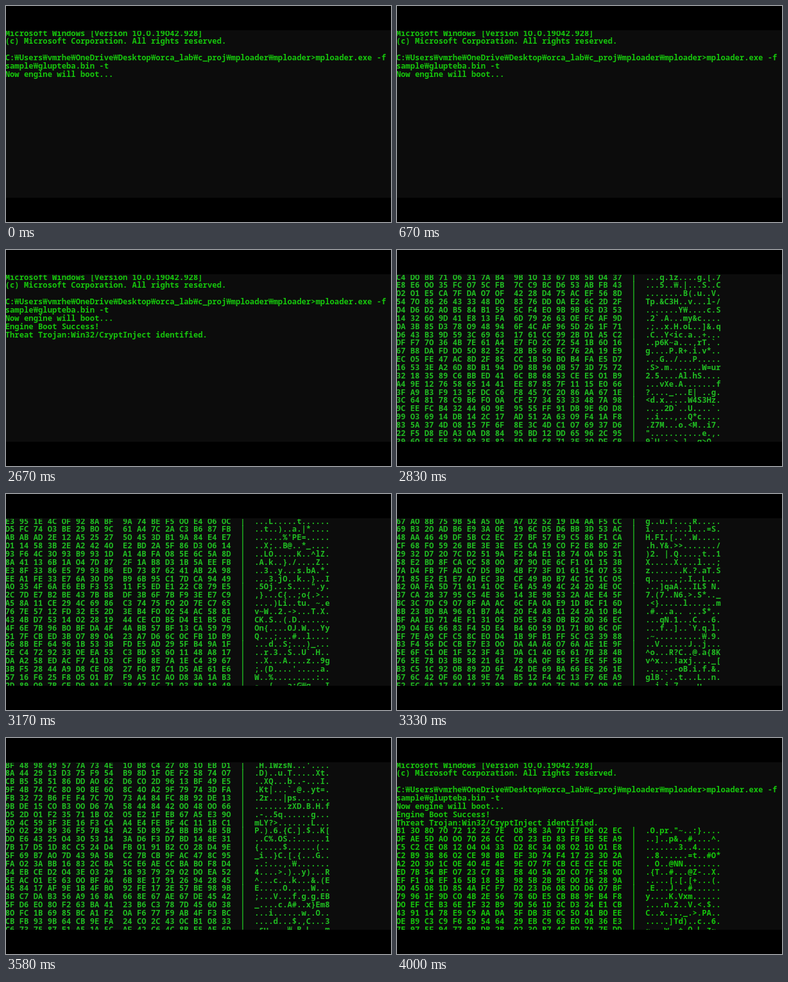
Write an HTML page with a canvas that moves like this. It is 600 by 338 pixels and loops after 4330 ms.

```html
<!DOCTYPE html>
<html lang="en">
<head>
<meta charset="utf-8">
<title>Console hex dump</title>
<style>
html, body { margin: 0; width: 100%; height: 100%; overflow: hidden; background: #000; }
canvas { display: block; width: 100vw; height: 100vh; }
</style>
</head>
<body>
<canvas width="600" height="338"></canvas>
<script>
const LOOP = 4330;
const CELL = 7.33, LEFT = -1.3, LINE = 12.85, BASELINE = 46.6, ROWS = 21;
const TOP = 38, BOTTOM = 300;
const GREEN = '#16c60c', DUMP_GREEN = '#20bc22';

const boot = [
  'Microsoft Windows [Version 10.0.19042.928]',
  '(c) Microsoft Corporation. All rights reserved.',
  '',
  'C:₩Users₩vmrhe₩OneDrive₩Desktop₩orca_lab₩c_proj₩mploader₩mploader>mploader.exe -f',
  'sample₩glupteba.bin -t',
  'Now engine will boot...'
];
const verdict = [
  'Engine Boot Success!',
  'Threat Trojan:Win32/CryptInject identified.'
];
const dumpHead = [
  'B1 30 80 70 72 12 22 7E 08 98 3A 7D E7 D6 02 EC',
  '0F AE 5D A0 00 70 26 CC C0 23 ED 83 FB EE 5E A9',
  'C5 C2 CE 08 12 04 04 33 D2 8C 34 08 02 10 01 E8',
  'C2 B9 38 86 02 CE 98 BB EF 3D 74 F4 17 23 30 2A',
  'A2 20 30 1C 0E 40 4E 4E 9E 07 7F CB CE CE CE DE',
  'ED 7B 54 BF 07 23 C7 83 E8 40 5A 2D C0 7F 58 0D',
  'EF F1 16 EF 16 5B 18 5B 98 5B 2B 9E 00 16 28 9A',
  '00 45 08 1D 85 4A FC F7 D2 23 D6 08 D0 D6 07 BF'
];

const ctx = document.querySelector('canvas').getContext('2d');

function randomByte(seed) {
  let h = Math.imul(seed + 1, 0x9e3779b1);
  h = Math.imul(h ^ (h >>> 15), 0x85ebca6b);
  h = Math.imul(h ^ (h >>> 13), 0xc2b2ae35);
  return (h >>> 16) & 255;
}

function dumpRow(row) {
  const bytes = dumpHead[row]
    ? dumpHead[row].split(' ').map(b => parseInt(b, 16))
    : Array.from({ length: 16 }, (_, i) => randomByte(row * 16 + i));
  const hex = bytes.map(b => b.toString(16).toUpperCase().padStart(2, '0'));
  const ascii = bytes.map(b =>
    b === 0x5c ? '₩' : b >= 0x20 && b < 0x7f ? String.fromCharCode(b) : '.');
  return hex.slice(0, 8).join(' ') + '  ' + hex.slice(8).join(' ') + '  |  ' + ascii.join('');
}

const dumpRows = (first, count) => Array.from({ length: count }, (_, i) => dumpRow(first + i));

// The console font has a plain zero, so it is drawn with the round letter.
function drawLine(text, row) {
  [...text].forEach((char, col) => {
    if (char !== ' ') {
      ctx.fillText(char === '0' ? 'O' : char, LEFT + (col + 0.5) * CELL, BASELINE + row * LINE);
    }
  });
}

function drawScreen(lines, { color = GREEN, cursor = false } = {}) {
  ctx.fillStyle = '#000';
  ctx.fillRect(0, 0, 600, 338);
  ctx.fillStyle = '#0c0c0c';
  ctx.fillRect(0, TOP, 600, BOTTOM - TOP);
  ctx.save();
  ctx.beginPath();
  ctx.rect(0, TOP + 1, 600, BOTTOM - TOP - 1);
  ctx.clip();
  ctx.font = '600 12.2px "Noto Sans Mono", "DejaVu Sans Mono", monospace';
  ctx.textAlign = 'center';
  ctx.fillStyle = color;
  lines.forEach(drawLine);
  if (cursor) {
    ctx.fillStyle = '#d4d8d4';
    ctx.fillRect(0, 122, 5, 4);
  }
  ctx.restore();
}

const showBoot = cursor => drawScreen(boot, { cursor });
const showVerdict = () => drawScreen([...boot, ...verdict]);
const showDump = page => drawScreen(dumpRows(page * 300, ROWS), { color: DUMP_GREEN });
const showResult = () => drawScreen([...boot, ...verdict, ...dumpRows(0, 13)]);

const scenes = [
  [0, () => showBoot(false)],
  [170, () => showBoot(true)],
  [670, () => showBoot(false)],
  [1170, () => showBoot(true)],
  [1750, () => showBoot(false)],
  [2250, () => showBoot(true)],
  [2670, showVerdict],
  ...[2750, 2830, 2920, 3000, 3080, 3170, 3250, 3330, 3420, 3500, 3580]
    .map((time, i) => [time, () => showDump(i + 1)]),
  [3670, showResult]
];

const start = performance.now();
let current = null;

function tick() {
  const time = (performance.now() - start) % LOOP;
  const scene = scenes.findLast(([from]) => from <= time);
  if (scene !== current) {
    current = scene;
    scene[1]();
  }
  requestAnimationFrame(tick);
}
tick();
</script>
</body>
</html>
```
